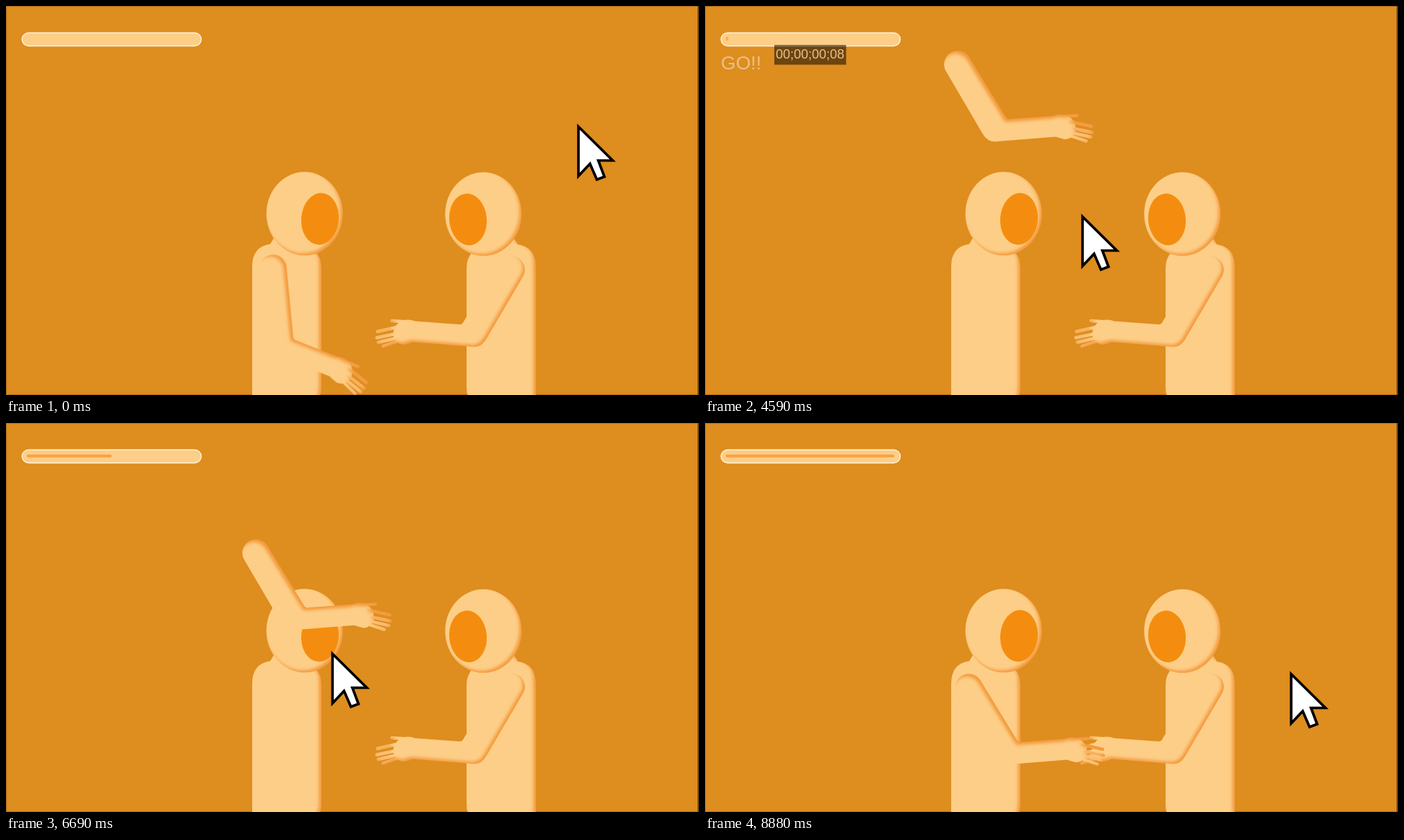
These frames come from a looping animation (960 by 540 pixels, 9.03 s). An HTML page:

```html
<!DOCTYPE html>
<html lang="pt">
<head>
<meta charset="utf-8">
<title>Aperta a mão</title>
<style>
  html, body { margin: 0; width: 100%; height: 100%; overflow: hidden; background: #de8d1f; }
  svg { display: block; width: 960px; height: 540px; }
  text { font-family: "Liberation Sans", Arial, sans-serif; fill: #f2f2f2; }
  .line { font-size: 26.5px; }
  .skin { fill: #fdce87; }
  .finger { fill: none; stroke: #fdce87; stroke-width: 4.4; stroke-linecap: round; }
  .back { stroke: var(--back, #fdce87); }
  .visor { fill: #f48d0f; }
  .anim, tspan { animation: 9030ms linear infinite both; }
  #fill { transform-origin: 29px 0; animation-name: fill; }
  #timer { animation-name: timer; }
  #go { animation-name: leave; }
  #task tspan { animation-name: task; }
  #go tspan { animation-name: go; }
  @keyframes fill { 0%, 50.14% { transform: scaleX(0); } 97.79%, 100% { transform: scaleX(1); } }
  @keyframes timer { 0%, 1.33% { opacity: 0; } 5.87%, 48.62% { opacity: 1; } 53.16%, 100% { opacity: 0; } }
  @keyframes leave { 0%, 48.62% { opacity: 1; } 53.16%, 100% { opacity: 0; } }
  @keyframes task { 0%, 2.1% { fill-opacity: 0; } 2.52%, 29.48% { fill-opacity: 1; } 29.9%, 100% { fill-opacity: 0; } }
  @keyframes go { 0%, 41.53% { fill-opacity: 0; } 41.95%, 99% { fill-opacity: 1; } 100% { fill-opacity: 0; } }
</style>
</head>
<body>
<svg viewBox="0 0 960 540">
  <defs>
    <!-- soft inner shade on the lower right edges -->
    <filter id="low" color-interpolation-filters="sRGB">
      <feOffset in="SourceAlpha" dx="-3.5" dy="-3.5"/>
      <feGaussianBlur stdDeviation="2.2" result="lit"/>
      <feFlood flood-color="#f49a3c"/>
      <feComposite in2="lit" operator="out"/>
      <feComposite in2="SourceGraphic" operator="atop"/>
    </filter>
    <!-- the same on the upper right edges -->
    <filter id="high" color-interpolation-filters="sRGB">
      <feOffset in="SourceAlpha" dx="-3.5" dy="3.5"/>
      <feGaussianBlur stdDeviation="2.2" result="lit"/>
      <feFlood flood-color="#f49a3c"/>
      <feComposite in2="lit" operator="out"/>
      <feComposite in2="SourceGraphic" operator="atop"/>
    </filter>
    <path id="body" class="skin" d="M341 548V362Q341 334 366 330.500L373 319 405 331Q437 335 437 364V530Q437 541 431 548Z"/>
    <ellipse id="head" class="skin" cx="413.700" cy="288.300" rx="53" ry="58"/>
    <ellipse id="visor" class="visor" cx="435" cy="295.500" rx="26" ry="36" transform="rotate(5 435 295.500)"/>
    <g id="arm">
      <path class="finger back" d="M494 153.500L515.500 152M509 161L535.500 167"/>
      <path class="finger" d="M510 170L536.500 175.500M509 176L534.500 182M503 179L528 187.500"/>
      <path class="skin" d="M333.500 90A18.600 18.600 0 0 1 366.500 72L416 153Q418 157.500 422 157L483 152.500C492 149 501 150 508 156.500Q515 164 513 174 508 186 498 185 491 183 486 181.500L405 188Q392 190 385 178Z"/>
    </g>
  </defs>

  <rect width="960" height="540" fill="#de8d1f"/>
  <path d="M0 .5H960M.5 0V540M0 539.500H960" stroke="#b06f18" fill="none"/>
  <path d="M959 0V540" stroke="#70460f" stroke-width="2"/>

  <text class="line" id="task" x="22" y="87.500">Aperta a mão ao outro astronauta</text>
  <text class="line anim" id="go" x="22" y="87.500">GO!!</text>

  <rect x="22.200" y="37.200" width="248.300" height="18.300" rx="9.150" fill="#fdce87" stroke="#fff3da" stroke-width="1.400"/>
  <rect class="anim" id="fill" x="29" y="43.700" width="233" height="4" rx="1" fill="#faa143"/>
  <g class="anim" id="timer">
    <rect x="96" y="54" width="99.500" height="27.500"/>
    <text id="clock" x="98" y="73" font-size="18"></text>
  </g>

  <g filter="url(#low)"><use href="#body"/></g>
  <g filter="url(#low)"><use href="#head"/></g>
  <use href="#visor"/>

  <g filter="url(#low)"><use href="#body" transform="translate(1075 .5) scale(-1 1)"/></g>
  <g filter="url(#low)"><use href="#head" transform="translate(1075 .5) scale(-1 1)"/></g>
  <use href="#visor" transform="translate(1075 .8) scale(-1 1)"/>
  <g filter="url(#low)"><use href="#arm" transform="translate(1050 285) scale(-1 1)"/></g>

  <g id="mover"><g filter="url(#high)" style="--back:#f6a54b"><use href="#arm"/></g></g>

  <g id="cursor" stroke="#000" fill="#fff">
    <path id="arrow" stroke-width="3.600" d="M2 4.500L49.500 51.500H29.500L38 74 27.500 78 18 56 2 73Z"/>
    <path id="hand" stroke-width="5.400" stroke-linejoin="round" stroke-linecap="round"
      d="M-6 47V8.500a6 6 0 0 1 12 0V22a5.700 5 0 0 1 11.400 0v4a5.700 5 0 0 1 11.400 0v4a5.700 5 0 0 1 11.400 0V48L36 75H-3L-25 43Q-30 33-20 32-14 33-6 47ZM6 20v13M17.400 24v10M28.800 28v9"/>
  </g>
</svg>
<script>
const LOOP = 9030, GRAB = 7000, DROP = 8120;
const $ = id => document.getElementById(id);

// time, x, y, angle
const armKeys = [
  [3900, 20, 283, 26], [4590, 0, 0, 0], [4850, 0, -23, 0], [5220, -1, 20, 0],
  [6180, -3, 71, 0], [GRAB, -4, 114, 0], [7380, 9, 126, 0], [DROP, 15.5, 286, 0]
];
// time, x, y
const cursorKeys = [
  [3900, 791, 163], [4590, 521, 288], [4800, 510, 296], [5220, 506, 317],
  [5790, 521, 453], [6180, 511, 377], [6660, 455, 320], [GRAB, 398, 277],
  [7380, 411, 289], [DROP, 417.5, 449], [8300, 470, 460], [8490, 581, 436], [8880, 810, 344]
];

// smooth curve through the keys that never overshoots them
function along(keys, t, c) {
  const last = keys.length - 1;
  if (t <= keys[0][0]) return keys[0][c];
  if (t >= keys[last][0]) return keys[last][c];
  const i = keys.findIndex(k => k[0] > t) - 1;
  const slope = j => (keys[j + 1][c] - keys[j][c]) / (keys[j + 1][0] - keys[j][0]);
  const tangent = j => {
    if (j === 0 || j === last) return 0;
    const a = slope(j - 1), b = slope(j);
    return a * b <= 0 ? 0 : 2 * a * b / (a + b);
  };
  const span = keys[i + 1][0] - keys[i][0], u = (t - keys[i][0]) / span, v = 1 - u;
  return keys[i][c] * v * v * (1 + 2 * u) + keys[i + 1][c] * u * u * (3 - 2 * u)
    + span * u * v * (tangent(i) * v - tangent(i + 1) * u);
}

function splitLetters(el) {
  const letters = [...el.textContent];
  el.textContent = "";
  letters.forEach((ch, i) => {
    const span = document.createElementNS("http://www.w3.org/2000/svg", "tspan");
    span.textContent = ch;
    span.style.animationDelay = i * 37.5 + "ms";
    el.append(span);
  });
}

const two = n => String(n).padStart(2, "0");

function draw(t) {
  const left = Math.max(0, Math.floor(238 - t / 20));
  $("clock").textContent = `00;00;${two(Math.floor(left / 30))};${two(left % 30)}`;
  const [ax, ay, turn] = [1, 2, 3].map(c => along(armKeys, t, c));
  $("mover").setAttribute("transform", `translate(${ax} ${ay}) rotate(${turn} 350 81)`);
  const [cx, cy] = [1, 2].map(c => along(cursorKeys, t, c));
  $("cursor").setAttribute("transform", `translate(${cx} ${cy})`);
  const held = t >= GRAB && t < DROP;
  $("hand").style.display = held ? "" : "none";
  $("arrow").style.display = held ? "none" : "";
}

splitLetters($("task"));
splitLetters($("go"));
draw(0);

let start;
function tick(now) {
  start ??= now;
  draw((now - start) % LOOP);
  requestAnimationFrame(tick);
}
requestAnimationFrame(tick);
</script>
</body>
</html>
```
